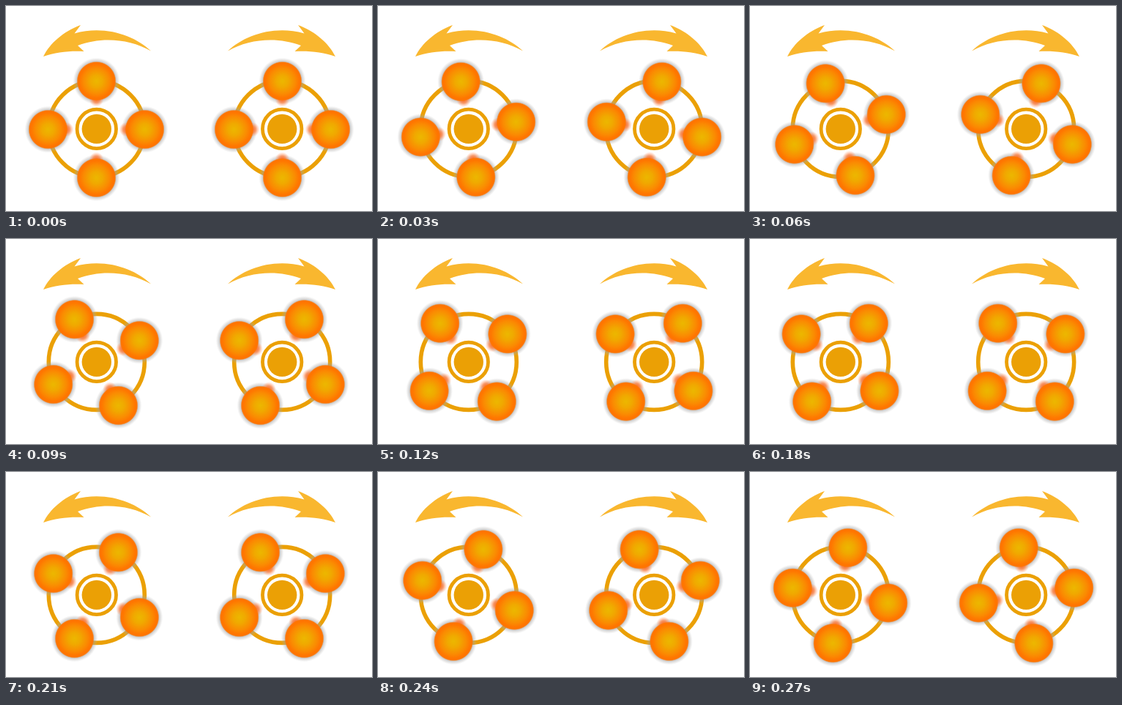
Animation, 500 px wide and 280 px high, one loop 0.3 s. Source, as an HTML page with a canvas:

```html
<!DOCTYPE html>
<html lang="en">
<head>
<meta charset="utf-8">
<title>Counter-rotating rings</title>
<style>
  html, body { margin: 0; width: 100%; height: 100%; overflow: hidden; background: #fff; }
  canvas { display: block; }
</style>
</head>
<body>
<canvas id="stage" width="500" height="280"></canvas>
<script>
const ctx = document.getElementById('stage').getContext('2d');
const GOLD = '#eba005';
const ARROW = '#f9b72f';
const STEP_MS = 30, STEPS = 10;
const STEP_ANGLE = Math.PI / 2 / STEPS;
const MIRROR_WIDTH = 501;
const HUB = { x: 123.8, y: 167.9 };
const ORBIT = 66;

const arrow = new Path2D(
  'M198 61.5 C175 40 135 26 93.5 37.5 L102 26 C78 35 60 51 51 69 ' +
  'C68 63 87 61 106.5 62 L98 54 C129 42 168 44 198 61.5 Z');

function radial(x, y, radius, stops) {
  const g = ctx.createRadialGradient(x, y, 0, x, y, radius);
  for (const [at, color] of stops) g.addColorStop(at, color);
  return g;
}

function disc(x, y, radius, fill) {
  ctx.beginPath();
  ctx.arc(x, y, radius, 0, Math.PI * 2);
  ctx.fillStyle = fill;
  ctx.fill();
}

function ring(radius, width) {
  ctx.beginPath();
  ctx.arc(HUB.x, HUB.y, radius, 0, Math.PI * 2);
  ctx.strokeStyle = GOLD;
  ctx.lineWidth = width;
  ctx.stroke();
}

const halo = radial(0, 0, 32, [
  [0, 'rgba(150,150,150,.7)'], [0.78, 'rgba(150,150,150,.7)'],
  [0.89, 'rgba(165,165,165,.36)'], [1, 'rgba(180,180,180,0)']
]);
const tail = radial(0, 0, 10, [
  [0, 'rgba(255,105,30,.95)'], [0.45, 'rgba(255,115,45,.7)'], [1, 'rgba(255,140,90,0)']
]);
const ball = radial(0, 0, 27, [
  [0, '#ecb700'], [0.3, '#f0a900'], [0.65, '#fa8b02'],
  [0.86, '#ff7500'], [0.94, '#ff7500'], [1, 'rgba(255,117,0,0)']
]);

function drawBalls(angle) {
  for (let i = 0; i < 4; i++) {
    ctx.save();
    ctx.translate(HUB.x - 0.3, HUB.y + 0.7);
    ctx.rotate(angle + i * Math.PI / 2);
    ctx.translate(0, -ORBIT);
    disc(0, 0, 32, halo);
    ctx.save();
    ctx.translate(0, 25);
    disc(0, 0, 10, tail);
    ctx.restore();
    disc(0, 0, 27, ball);
    ctx.restore();
  }
}

function drawWheel(angle) {
  ctx.fillStyle = ARROW;
  ctx.fill(arrow);
  ring(65.5, 5.6);
  drawBalls(angle);
  ring(26.7, 4.8);
  disc(HUB.x, HUB.y, 20.2, GOLD);
}

function frame() {
  const step = Math.floor(performance.now() / STEP_MS) % STEPS;
  const angle = -step * STEP_ANGLE;
  ctx.fillStyle = '#fff';
  ctx.fillRect(0, 0, 500, 280);
  drawWheel(angle);
  ctx.save();
  ctx.translate(MIRROR_WIDTH, 0);
  ctx.scale(-1, 1);
  drawWheel(angle);
  ctx.restore();
  requestAnimationFrame(frame);
}
frame();
</script>
</body>
</html>
```
